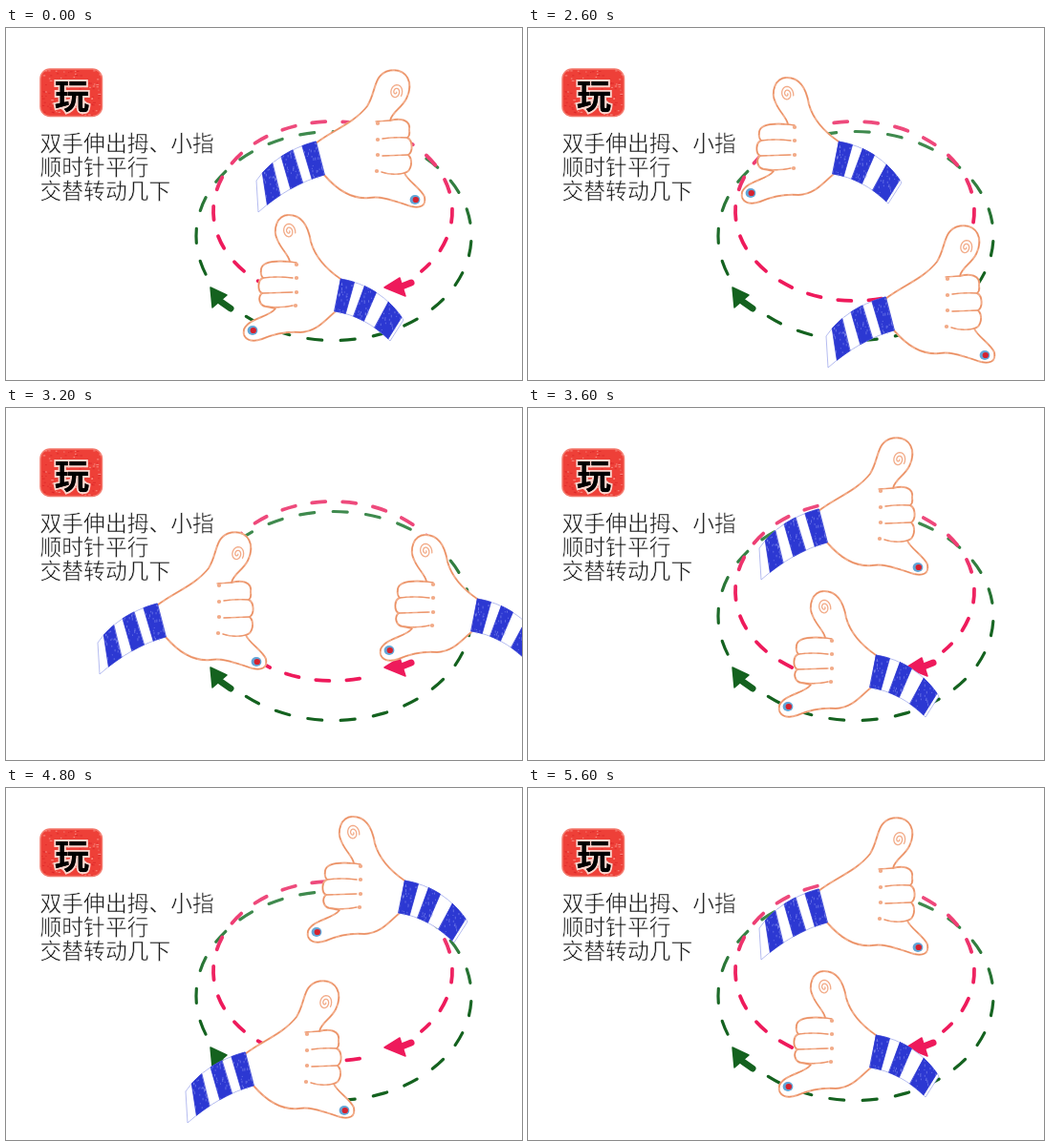
Recreate the animation shown at these times as an HTML page with a canvas. Size 540 px wide and 369 px high, loop 5.8 s.

```html
<!DOCTYPE html>
<html lang="zh-CN">
<head>
<meta charset="utf-8">
<title>双手游戏</title>
<style>
  html, body { margin: 0; width: 100%; height: 100%; overflow: hidden; background: #fff; }
  canvas { position: absolute; left: 0; top: 0; width: 540px; height: 369px; }
  .label { position: absolute; white-space: nowrap; font-family: "Noto Sans CJK SC", "Noto Sans CJK", sans-serif; }
  .rules { left: 35.5px; top: 107px; font-size: 22.8px; font-weight: 300; line-height: 25.2px; color: #1c1c1c;
    -webkit-text-stroke: 0.5px #fff; }
  .badge { left: 35px; top: 42px; width: 68px; height: 54px; line-height: 54px; text-align: center;
    font-size: 36px; font-weight: 900; color: #000; -webkit-text-stroke: 4px #fbd5cd; paint-order: stroke fill; }
  .badge.ink { -webkit-text-stroke: 0; }
</style>
</head>
<body>
<canvas id="stage"></canvas>
<div class="label badge" aria-hidden="true">玩</div>
<div class="label badge ink">玩</div>
<div class="label rules">双手伸出拇、小指<br>顺时针平行<br>交替转动几下</div>
<script>
const W = 540, H = 369, LOOP = 5800, HOLD = 2000, STEP = 200;
const canvas = document.getElementById('stage');
const ctx = canvas.getContext('2d');
const ratio = window.devicePixelRatio || 1;
canvas.width = W * ratio;
canvas.height = H * ratio;

const RED = '#ee1a5b', PINK = '#ee4a7c', GREEN = '#14621f', LEAF = '#3f8a4e';
const BLUE = '#2c38d2', SKIN = '#f2ab88';

let seed = 1;
function rnd() {
  seed = (seed * 16807) % 2147483647;
  return seed / 2147483647;
}

// Each hand is drawn in its resting place; stops hold the little fingernail.
const rightHand = {
  outline: new Path2D('M324 121 C340 108 364 100 378 82 C388 66 384 48 402 44.5 C420 42 427 58 419 74 ' +
    'C414 84 404 88 402 97 C412 94 424 96 422 107 Q423 113 420 115 C426 118 426 130 421 133 ' +
    'C426 138 425 150 417 152 C420 160 434 168 438 177 C440 187 433 189 424 187 ' +
    'C408 182 395 176 380 178 C360 180 345 168 333 154'),
  folds: new Path2D('M402 97 L387 98 M420 115 Q408 114 394 116 M421 133 L394 134 M417 152 Q405 155 393 151'),
  knuckles: [[389, 100], [389, 117], [389, 133], [388, 150]],
  print: [408, 67, 0.25],
  upper: [[324, 119], [283, 130], [262, 160]],
  lower: [[333, 154], [297, 164], [264, 193]],
  stripes: [[0, .18], [.32, .5], [.66, .86]],
  stops: [[428, 180], [488, 195], [524, 251], [506, 312], [478, 343],
          [354, 338], [282, 320], [262, 266], [311, 207], [408, 167]]
};
const leftHand = {
  outline: new Path2D('M350 263 C337 254 324 242 319 224 C316 206 308 196 296 196 C283 196 279 212 284 222 ' +
    'C288 232 296 238 297 245 C285 244 268 244 267 253 Q266 259 269 262 C263 264 263 276 268 278 ' +
    'C263 282 265 291 272 292 L282 294 C276 303 254 304 249 316 C247 327 257 330 268 326 ' +
    'C282 320 296 318 308 319 C326 318 334 306 345 297'),
  folds: new Path2D('M297 245 L304 246 M269 262 Q284 260 300 262 M268 278 L300 277 M272 292 Q288 294 300 291'),
  knuckles: [[304, 248], [304, 262], [304, 277], [303, 291]],
  print: [296, 213, -0.15],
  upper: [[350, 263], [392, 270], [416, 306]],
  lower: [[344, 297], [376, 302], [402, 328]],
  stripes: [[0, .18], [.32, .5], [.7, .96]],
  stops: [[258, 317], [205, 287], [195, 256], [208, 205], [233, 173],
          [325, 151], [373, 172], [401, 254], [363, 296], [272, 313]]
};

function bend([a, c, b], t) {
  const u = 1 - t;
  return [0, 1].map(i => u * u * a[i] + 2 * u * t * c[i] + t * t * b[i]);
}

function band(hand, from, to) {
  const path = new Path2D(), n = 8;
  for (let i = 0; i <= n; i++) path.lineTo(...bend(hand.upper, from + (to - from) * i / n));
  for (let i = n; i >= 0; i--) path.lineTo(...bend(hand.lower, from + (to - from) * i / n));
  path.closePath();
  return path;
}

function line(path, color, width) {
  ctx.strokeStyle = color;
  ctx.lineWidth = width;
  ctx.stroke(path);
}

function dot(x, y, rx, ry, tilt = 0) {
  const path = new Path2D();
  path.ellipse(x, y, rx, ry, tilt, 0, Math.PI * 2);
  return path;
}

function crayon(path, width) {
  line(path, SKIN, width);
  ctx.setLineDash([7, 4, 3, 6, 11, 5]);
  line(path, '#e98a5c', width * 0.5);
  ctx.setLineDash([]);
}

function spiral(cx, cy, tilt) {
  const path = new Path2D();
  for (let a = 0; a < 13; a += 0.3) {
    const r = 1 + a * 0.6, x = r * 0.78 * Math.cos(a), y = r * Math.sin(a);
    path.lineTo(cx + x * Math.cos(tilt) - y * Math.sin(tilt), cy + x * Math.sin(tilt) + y * Math.cos(tilt));
  }
  return path;
}

function drawSleeve(hand) {
  const whole = band(hand, 0, 1);
  ctx.fillStyle = '#fff';
  ctx.fill(whole);
  line(whole, '#a3abec', 0.8);
  for (const [from, to] of hand.stripes) {
    const stripe = band(hand, from, to);
    ctx.fillStyle = BLUE;
    ctx.fill(stripe);
    line(stripe, BLUE, 0.8);
    // pale grain of the crayon
    for (let i = 0; i < 24; i++) {
      const t = from + (to - from) * rnd(), k = rnd();
      const a = bend(hand.upper, t), b = bend(hand.lower, t);
      const x = a[0] + (b[0] - a[0]) * k, y = a[1] + (b[1] - a[1]) * k;
      ctx.fillStyle = 'rgba(150,160,245,.5)';
      ctx.fillRect(x, y, 1, 1 + rnd() * 2);
    }
  }
}

function drawHand(hand, pose) {
  const [home, at] = [hand.stops[0], hand.stops[pose]];
  ctx.save();
  ctx.translate(at[0] - home[0], at[1] - home[1]);
  ctx.fillStyle = '#fff';
  ctx.fill(hand.outline);
  crayon(hand.outline, 2);
  crayon(hand.folds, 1.5);
  ctx.fillStyle = SKIN;
  for (const [x, y] of hand.knuckles) ctx.fill(dot(x, y, 2.2, 2));
  line(spiral(...hand.print), SKIN, 1.3);
  drawSleeve(hand);
  ctx.fillStyle = '#62a5d6';
  ctx.fill(dot(home[0], home[1], 5.4, 5));
  ctx.fillStyle = '#d5222f';
  ctx.fill(dot(home[0] + 0.8, home[1], 3.2, 3.1));
  ctx.restore();
}

function drawTrack(cx, cy, rx, ry, from, to, dash, width, [top, bottom]) {
  const path = new Path2D(), rad = Math.PI / 180;
  path.ellipse(cx, cy, rx, ry, 0, from * rad, to * rad);
  const shade = ctx.createLinearGradient(0, cy - ry, 0, cy + ry);
  shade.addColorStop(0.1, top);
  shade.addColorStop(0.6, bottom);
  ctx.setLineDash(dash);
  line(path, shade, width);
  ctx.setLineDash([]);
}

function drawArrow(head, tail, color) {
  const tip = new Path2D(`M${head}Z`);
  ctx.fillStyle = color;
  ctx.fill(tip);
  line(tip, color, 1.5);
  line(new Path2D(`M${tail}`), color, 7);
}

function drawBadge() {
  ctx.fillStyle = '#ee4038';
  ctx.beginPath();
  ctx.roundRect(36, 43, 64.5, 49.5, 10);
  ctx.fill();
  ctx.strokeStyle = '#f4786c';
  ctx.lineWidth = 1.5;
  ctx.stroke();
  for (let i = 0; i < 150; i++) {
    ctx.fillStyle = rnd() < 0.5 ? 'rgba(255,190,180,.6)' : 'rgba(215,30,35,.6)';
    ctx.fillRect(37 + rnd() * 61, 44 + rnd() * 47, 1 + rnd() * 2, 1);
  }
}

function draw(pose) {
  seed = 77;
  ctx.setTransform(ratio, 0, 0, ratio, 0, 0);
  ctx.fillStyle = '#fff';
  ctx.fillRect(0, 0, W, H);
  ctx.lineCap = ctx.lineJoin = 'round';
  drawBadge();
  drawTrack(343, 218, 144, 109.5, 158.5, 493, [15, 19.4], 3.2, [LEAF, GREEN]);
  drawTrack(342, 192, 125, 94, 77, 402, [14, 18], 3.8, [PINK, RED]);
  drawArrow('214 272L231 280L216 293', '225 287L235 294', GREEN);
  drawArrow('396 272L412 262L418 281', '414 271L424 267', RED);
  drawHand(rightHand, pose);
  drawHand(leftHand, pose);
}

let shown = -1;
function tick(now) {
  const t = now % LOOP;
  const pose = t < HOLD ? 0 : (1 + Math.floor((t - HOLD) / STEP)) % 10;
  if (pose !== shown) draw(shown = pose);
  requestAnimationFrame(tick);
}
draw(shown = 0);
requestAnimationFrame(tick);
</script>
</body>
</html>
```
